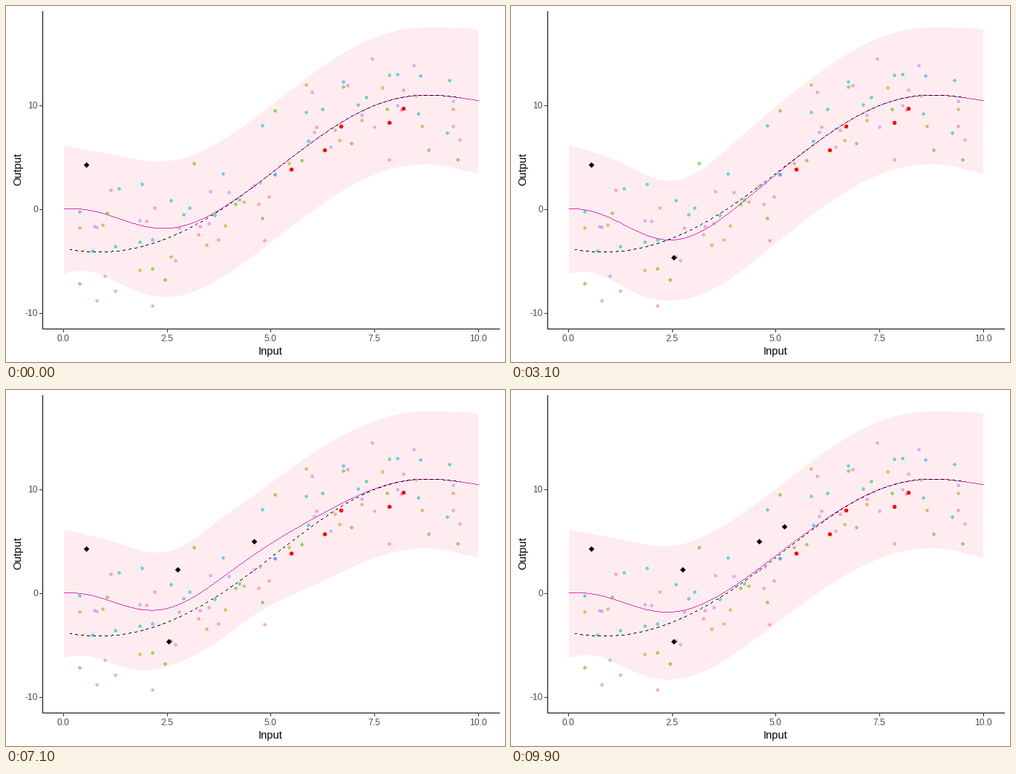
Animation, 672 px wide and 480 px high, one loop 10 s. Source, as a matplotlib script:

```python
import numpy as np
import matplotlib.pyplot as plt
from matplotlib.animation import FuncAnimation
from numpy.polynomial import Polynomial

W, H, DPI = 672, 480, 96
STATES, STEPS, HOLD = 5, 20, 10
PX = 72 / DPI  # one pixel in points
LEFT, RIGHT, TOP, BOTTOM = 49.0, 663.7, 7.0, 434.8
X0, Y0 = 76.94, 273.5  # pixel position of the data origin
UNIT_X, UNIT_Y = 55.88, 14.0

plt.rcParams["font.family"] = "Liberation Sans"
fig = plt.figure(figsize=(W / DPI, H / DPI), dpi=DPI, facecolor="white")
ax = fig.add_axes([LEFT / W, 1 - BOTTOM / H, (RIGHT - LEFT) / W, (BOTTOM - TOP) / H])
ax.set(xlim=((LEFT - X0) / UNIT_X, (RIGHT - X0) / UNIT_X),
       ylim=((Y0 - BOTTOM) / UNIT_Y, (Y0 - TOP) / UNIT_Y), xticks=[], yticks=[])
ax.patch.set_visible(False)
for side, spine in ax.spines.items():
    spine.set_visible(side in ("left", "bottom"))
    spine.set_linewidth(PX)

# Gaussian process: smooth prior mean, squared exponential kernel, wider at the edges
prior_mean = Polynomial.fit([0, 1.5, 3, 5, 7, 8.5, 10],
                            [-3.85, -3.98, -1.95, 3.4, 9.0, 10.88, 10.38], 6)
SIGNAL, LENGTH, NOISE = 5.3, 1.16, 6.0


def edge(x, at):
    return 1.12 * np.exp(-0.5 * ((x - at) / 0.65) ** 2)


def kernel(a, b):
    a, b = a[:, None], b[None, :]
    smooth = SIGNAL * np.exp(-0.5 * ((a - b) / LENGTH) ** 2)
    return smooth + sum(edge(a, at) * edge(b, at) for at in (-0.3, 10))


# One grid point per pixel column
grid = (np.arange(77, 636) + 0.5 - X0) / UNIT_X
grid_var = np.diag(kernel(grid, grid)) + NOISE
obs_x = np.array([0.55, 2.55, 2.75, 4.6, 5.2])
obs_y = np.array([4.25, -4.68, 2.25, 5.0, 6.4])


def posterior(count):
    x, y = obs_x[:count], obs_y[:count]
    cross = kernel(grid, x)
    gain = np.linalg.solve(kernel(x, x) + NOISE * np.eye(count), cross.T).T
    mean = prior_mean(grid) + gain @ (y - prior_mean(x))
    half = 1.96 * np.sqrt(grid_var - (gain * cross).sum(axis=1))
    return np.array([mean, mean - half, mean + half])


curves = [posterior(n + 1) for n in range(STATES)]


def pixel_line(x, y, color, zorder):
    """Crisp line without smoothing: one pixel in each column."""
    return ax.plot(x, y, ls="", marker=",", color=color, zorder=zorder)[0]


band = ax.fill_between(grid, curves[0][1], curves[0][2], color="#FEECF0", lw=0, zorder=1)
mean_line = pixel_line(grid, curves[0][0], "#E131BF", 2)

dash_x = grid[(grid > 0.15) & (grid < 9.55)]
dash_y = prior_mean(dash_x)
travel = np.cumsum(np.hypot(1, np.gradient(dash_y, dash_x) * UNIT_Y / UNIT_X))
dash_on = travel % 8 < 4
pixel_line(dash_x[dash_on], dash_y[dash_on], "black", 3)

# Seven groups of noisy samples around the prior mean
rng = np.random.default_rng(4)
PER_GROUP = 14
for color in ("#F8766D", "#C49A00", "#53B400", "#00C094", "#00B6EB", "#A58AFF", "#FB61D7"):
    spread = (np.arange(PER_GROUP) + rng.random(PER_GROUP)) / PER_GROUP
    xs = np.round((0.15 + 9.4 * spread) / 0.05) * 0.05
    ys = prior_mean(xs) + np.clip(rng.normal(0, 3.1, PER_GROUP), -6, 6)
    ax.scatter(xs, ys, s=7, color=color, alpha=0.5, lw=PX, antialiased=False, zorder=4)

ax.scatter([5.5, 6.3, 6.7, 7.85, 8.2], [3.8, 5.65, 7.95, 8.35, 9.65], s=17, color="red",
           lw=0, antialiased=False, zorder=5)
observed = ax.scatter(obs_x, obs_y, s=16, marker="D", color="black", lw=0,
                      antialiased=False, zorder=6)


def label(x, y, text, size, color, **kw):
    kw = {"ha": "center", "va": "baseline", "rotation_mode": "anchor", **kw}
    fig.text(x / W, 1 - y / H, text, fontsize=size, color=color, **kw)


def tick(xs, ys):
    line = plt.Line2D([x / W for x in xs], [1 - y / H for y in ys], color="#333333", lw=PX)
    fig.add_artist(line)


for value in np.arange(0, 10.1, 2.5):
    x = X0 + UNIT_X * value
    tick((x, x), (BOTTOM, BOTTOM + 3.7))
    label(x, 451.5, f"{value:.1f}", 9, "#4D4D4D")
for value in (-10, 0, 10):
    y = Y0 - UNIT_Y * value
    tick((LEFT - 3.7, LEFT), (y + 0.2, y + 0.2))
    label(43, y + 4.4, str(value), 9, "#4D4D4D", ha="right")
label(356.5, 470, "Input", 11, "black")
label(20, 219.8, "Output", 11, "black", rotation=90)


def update(frame):
    state, step = divmod(frame, STEPS)
    mix = max(0, step - HOLD) / (STEPS - HOLD)
    now, following = curves[state], curves[(state + 1) % STATES]
    mean, low, high = now + mix * (following - now)
    mean_line.set_ydata(mean)
    outline = np.column_stack([np.r_[grid, grid[::-1]], np.r_[low, high[::-1]]])
    band.set_verts([outline])
    count = state + 1
    observed.set_offsets(np.column_stack([obs_x[:count], obs_y[:count]]))
    return band, mean_line, observed


anim = FuncAnimation(fig, update, frames=STATES * STEPS, interval=100,
                     init_func=lambda: update(0), repeat=True, repeat_delay=0)
plt.show()
```
